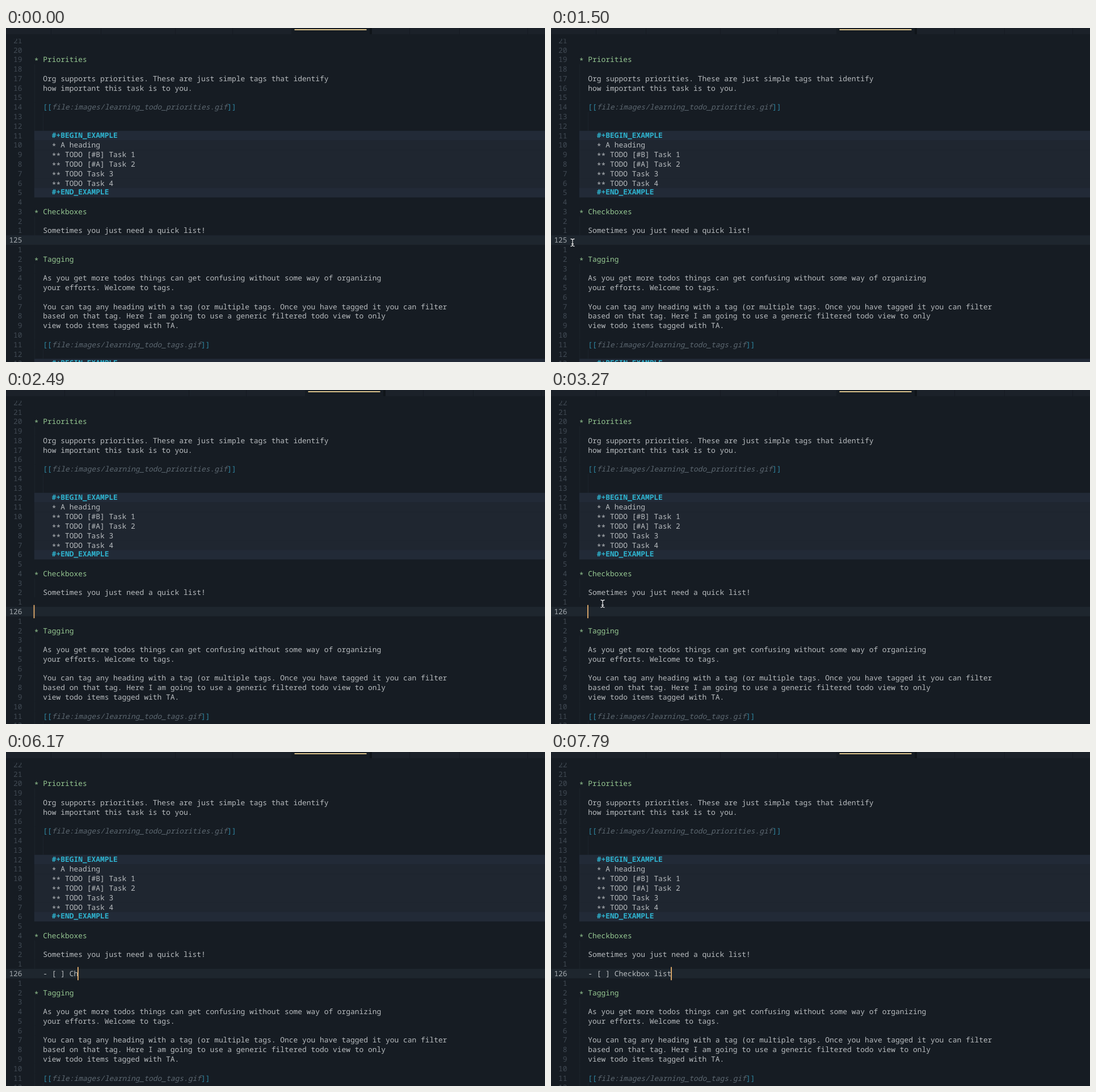
An HTML page with a canvas that plays this animation: 950 by 590 pixels, repeating every 8000 ms.

```html
<!DOCTYPE html>
<html lang="en">
<head>
<meta charset="utf-8">
<title>Org checkbox list</title>
<style>
html, body { margin: 0; width: 100%; height: 100%; overflow: hidden; background: #161c23; }
canvas { display: block; }
</style>
</head>
<body>
<canvas id="stage" width="950" height="590"></canvas>
<script>
const ctx = document.getElementById('stage').getContext('2d');
const LOOP = 8000, CW = 7.74, ROW = 16.78, LEFT = 49.8, GUTTER = 28.6;
const FACE = '12.9px "Noto Sans Mono", "DejaVu Sans Mono", monospace';
const INK = {
  bg: '#161c23', bar: '#1b2129', gap: '#151a21', tabEnd: '#10151a', accent: '#dcc48c',
  line: '#1e262e', block: '#1f2630', fence: '#222a37', guide: '#1c232b',
  text: '#b9bdc0', number: '#414a54', current: '#a5abb0', head: '#96c892',
  bracket: '#2f88a3', link: '#5d6871', directive: '#2fb4d0', caret: '#e6b06e', error: '#b5282c'
};

const page = `

* Priorities

  Org supports priorities. These are just simple tags that identify
  how important this task is to you.

  [[file:images/learning_todo_priorities.gif]]


    #+BEGIN_EXAMPLE
    * A heading
    ** TODO [#B] Task 1
    ** TODO [#A] Task 2
    ** TODO Task 3
    ** TODO Task 4
    #+END_EXAMPLE

* Checkboxes

  Sometimes you just need a quick list!


* Tagging

  As you get more todos things can get confusing without some way of organizing
  your efforts. Welcome to tags.

  You can tag any heading with a tag (or multiple tags. Once you have tagged it you can filter
  based on that tag. Here I am going to use a generic filtered todo view to only
  view todo items tagged with TA.

  [[file:images/learning_todo_tags.gif]]

    #+BEGIN_EXAMPLE`.split('\n');

const INSERT = 2260, OPEN = 2490, SETTLE = 2580, INDENT = 3030, HIDE = 4050;

// Typing bursts: text, start time, time per key
const bursts = [['- ', 4050, 150], ['[ ', 4910, 160], [']', 5460, 1], [' Ch', 5850, 160],
  ['eck', 6240, 75], ['bo', 6620, 70], ['x ', 6850, 70], ['list', 7620, 56]];

// Pointer glides: start and end time, start and end place
const glides = [
  [320, 480, [658, 472], [525, 411]],
  [630, 780, [420, 398], [178, 364]],
  [950, 1350, [156, 364], [12, 379]],
  [1430, 1590, [38, 379], [91, 377.5]]
];
const FRAME = 80;

const rowY = i => 22.2 + ROW * i;
const colX = c => LEFT + CW * c;
const clamp = (v, max) => Math.max(0, Math.min(max, v));
const between = (t, from, to) => t >= from && t < to;

function typed(t) {
  if (t < INDENT) return '';
  return '  ' + bursts.map(([str, start, pace]) =>
    str.slice(0, clamp(Math.floor((t - start) / pace) + 1, str.length))).join('');
}

function pointerAt(t) {
  // Each key press hides the pointer until the mouse is nudged.
  if (t >= HIDE || between(t, INSERT, 2740) || between(t, INDENT, 3270)) return null;
  const glide = glides.findLast(g => g[0] <= t);
  if (!glide) return null;
  const [start, end, from, to] = glide;
  const steps = Math.round((end - start) / FRAME);
  const k = clamp(Math.floor((t - start) / (end - start) * steps), steps) / steps;
  return from.map((v, i) => v + (to[i] - v) * k);
}

function box(x, y, w, h, color) {
  ctx.fillStyle = color;
  ctx.fillRect(x, y, w, h);
}

// Sets each character on the editor's fixed grid.
function write(str, x, i, color, style = '300') {
  ctx.font = style + ' ' + FACE;
  ctx.fillStyle = color;
  [...str].forEach((ch, n) => {
    if (ch !== ' ') ctx.fillText(ch, x + n * CW, rowY(i) + (ch === '*' ? 6.6 : 4.6));
  });
}

function writeLine(str, i) {
  const indent = str.search(/\S/);
  if (indent < 0) return;
  const body = str.trim(), x = colX(indent);
  if (body.startsWith('[[')) {
    const name = body.slice(2, -2);
    write('[[', x, i, INK.bracket);
    write(name, x + 2 * CW, i, INK.link, 'italic 300');
    write(']]', x + (2 + name.length) * CW, i, INK.bracket);
  } else if (body.startsWith('#+')) {
    write(body, x, i - 0.05, INK.directive, 'bold');
  } else {
    write(body, x, i, indent ? INK.text : INK.head);
  }
}

function drawTabs(dx) {
  box(0, 0, 950, 11, INK.bar);
  [79, 167, 298, 399, 711, 799, 919].forEach(x => box(x + dx, 0, 1, 11, INK.gap));
  box(503 + dx, 0, 138, 11, INK.bg);
  box(641 + dx, 0, 4, 11, INK.tabEnd);
  box(508.5 + dx, 2, 127, 2, INK.accent);
}

function drawPointer(x, y) {
  ctx.beginPath();
  for (const side of [-3.5, 3.5]) {
    ctx.moveTo(x + side, y - 6.5);
    ctx.quadraticCurveTo(x, y - 6.5, x, y - 4);
    ctx.lineTo(x, y + 4);
    ctx.quadraticCurveTo(x, y + 6.5, x + side, y + 6.5);
  }
  ctx.moveTo(x - 2, y + 2.5);
  ctx.lineTo(x + 2, y + 2.5);
  for (const [width, color] of [[2.6, '#10151a'], [1.3, '#e4e6e8']]) {
    ctx.lineWidth = width;
    ctx.strokeStyle = color;
    ctx.stroke();
  }
}

// Guides follow the indent of the next line that has text.
function drawGuides(lines, i) {
  const next = lines.slice(i).find(str => str.trim());
  for (let c = 0; c < next.search(/\S/); c += 2) {
    box(Math.floor(colX(c) + 0.3), rowY(i) - ROW / 2, 1, ROW, INK.guide);
  }
}

function drawLines(lines, cur) {
  let inBlock = false;
  lines.forEach((str, i) => {
    const top = rowY(i) - ROW / 2;
    if (str.includes('#+BEGIN')) inBlock = true;
    if (i === cur) box(0, top, 950, ROW, INK.line);
    else if (inBlock) box(LEFT, top, 950, ROW + 0.3, str.includes('#+') ? INK.fence : INK.block);
    else drawGuides(lines, i);
    if (str.includes('#+END')) inBlock = false;
    const number = String(i === cur ? 104 + cur : Math.abs(i - cur));
    write(number, GUTTER - number.length * CW, i, i === cur ? INK.current : INK.number);
    writeLine(str, i);
  });
}

function draw(t) {
  const cur = t < OPEN ? 21 : 22, item = typed(t), col = item.length;
  const paired = item.endsWith('[');
  const lines = [...page];
  if (t >= OPEN) {
    const close = item.endsWith('[ ') ? ']' : '';
    lines.splice(cur, 0, paired ? item.slice(0, -1) : item + close);
  }

  box(0, 0, 950, 590, INK.bg);
  ctx.save();
  ctx.beginPath();
  ctx.rect(0, 19, 950, 571);
  ctx.clip();
  drawLines(lines, cur);
  if (paired) write('[]', colX(col - 1), cur, INK.error);
  ctx.restore();

  drawTabs(between(t, OPEN, SETTLE) ? 24 : 0);
  if (t >= INSERT) box(colX(col) - 1.2, rowY(cur) - 11.6, 1.8, 23.4, INK.caret);
  const spot = pointerAt(t);
  if (spot) drawPointer(...spot);
}

ctx.textRendering = 'geometricPrecision';
const start = performance.now();
function tick() {
  draw((performance.now() - start) % LOOP);
  requestAnimationFrame(tick);
}
tick();
</script>
</body>
</html>
```
